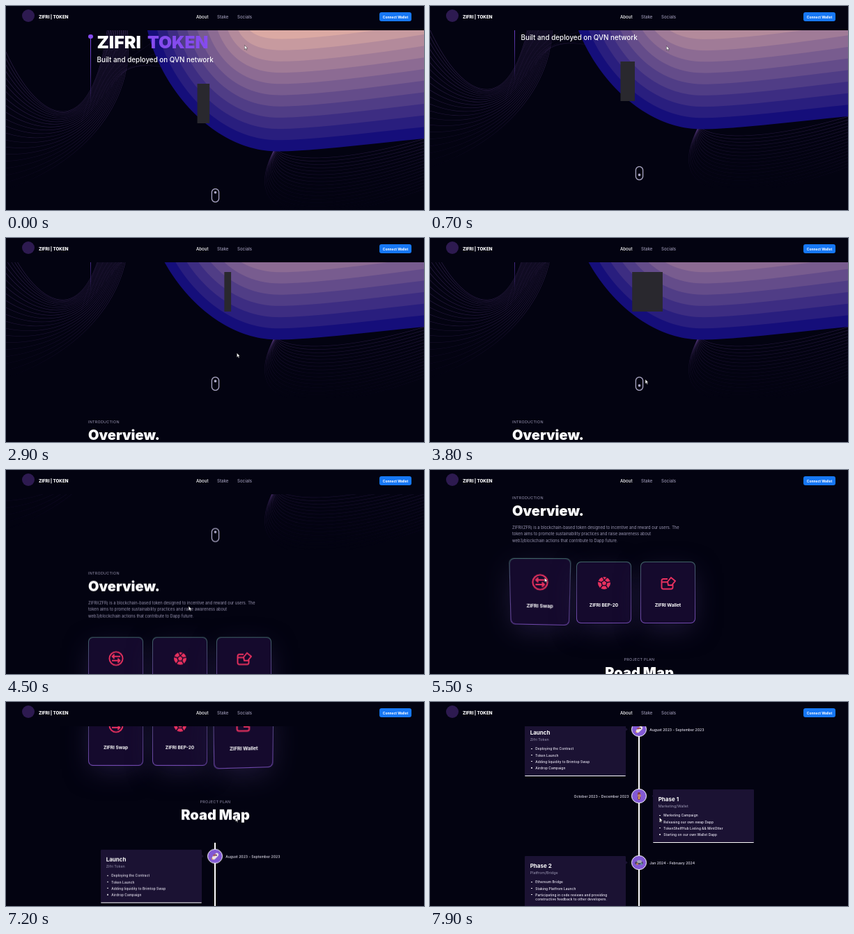
An HTML page with a canvas for the animation above (8000 ms loop, 600 by 294 pixels).

```html
<!DOCTYPE html>
<html lang="en">
<head>
<meta charset="utf-8">
<title>Token landing page</title>
<style>
  html, body { margin: 0; width: 100%; height: 100%; overflow: hidden; background: #030311; }
  #stage { position: relative; width: 600px; height: 294px; overflow: hidden; font-family: Inter, "Open Sans", sans-serif; }
  #page, #head, #stage canvas, .text, .box, .card { position: absolute; }
  #page { left: 0; top: 0; width: 600px; height: 920px; will-change: transform; }
  #page canvas { left: 0; top: 0; }
  #head { left: 0; top: 0; width: 600px; height: 34.5px; background: #030311; }
  .text { line-height: 0; white-space: pre; }
  .middle { transform: translateX(-50%); }
  .end { transform: translateX(-100%); }
  .card { top: 420px; width: 79px; height: 89px; border-radius: 6.5px;
    background: linear-gradient(#3f6466, #53427f 45%, #7048ad);
    box-shadow: 0 11px 38px -5px #211a3d; }
  .card::before { content: ""; position: absolute; inset: .6px; border-radius: 6px; background: #150a2d; }
  .card svg { position: absolute; left: 28.5px; top: 20px; width: 22px; height: 22px; }
  .panel { width: 145px; background: #1b1233; border-radius: 1.3px; border-bottom: 1.3px solid #fff; box-sizing: border-box; }
  #cursor { position: absolute; left: 0; top: 0; width: 6px; height: 9px; }
</style>
</head>
<body>
<div id="stage">
  <div id="page">
    <canvas id="backdrop"></canvas>
    <canvas id="model"></canvas>
  </div>
  <div id="head"></div>
  <svg id="cursor" viewBox="0 0 6 9"><path d="M.4.4V6.6L1.9 5.3 2.9 7.6 3.9 7.1 2.9 4.9H4.7Z" fill="#fff" stroke="#111" stroke-width=".4"/></svg>
</div>
<script>
const LOOP = 8000, SCALE = 2, GREY = '#9b97b3';
const $ = id => document.getElementById(id);
const page = $('page'), head = $('head');

const clamp = v => Math.min(1, Math.max(0, v));
const ease = v => { v = clamp(v); return v * v * (3 - 2 * v); };

// Linear interpolation through [seconds, value...] keys.
function track(keys, t) {
  const next = keys.findIndex(k => k[0] > t);
  if (next < 0) return keys[keys.length - 1].slice(1);
  if (next === 0) return keys[0].slice(1);
  const a = keys[next - 1], b = keys[next], u = (t - a[0]) / (b[0] - a[0]);
  return a.slice(1).map((v, i) => v + (b[i + 1] - v) * u);
}

const scrollKeys = [
  [0, 0], [.2, 0], [.42, 32], [1.82, 32], [2.08, 95], [2.35, 95], [2.6, 63], [3.85, 63],
  [4.1, 95], [4.35, 160], [4.6, 192], [4.85, 256], [5.05, 288], [6.92, 288], [7, 312],
  [7.1, 376], [7.2, 417], [7.3, 442], [7.4, 448], [7.6, 448], [7.7, 478], [7.8, 544], [7.9, 600]
];
const cursorKeys = [
  [0, 342, 56], [.7, 339, 57], [1.2, 339, 62], [1.8, 338, 115], [2.1, 338, 145], [2.8, 334, 160],
  [3.6, 310, 202], [3.9, 308, 204], [4.5, 262, 196], [5.1, 168, 158], [5.5, 164, 155],
  [5.85, 172, 158], [6.1, 245, 162], [6.3, 303, 165], [6.5, 329, 166]
];
const spinKeys = [[0, -108], [.7, -69], [2.1, 64], [3.8, 140], [8, 400]];

function add(parent, className, style) {
  const el = document.createElement('div');
  el.className = className;
  Object.assign(el.style, style);
  parent.append(el);
  return el;
}

// y is the middle of the capital letters.
function text(parent, x, y, str, size, weight = 400, color = '#fff', align = '', spacing = 0) {
  const el = add(parent, 'text ' + align, {
    left: x + 'px', top: y + 'px', fontSize: size + 'px',
    fontWeight: weight, color, letterSpacing: spacing + 'em'
  });
  el.textContent = str;
}

const box = (parent, x, y, w, h, background, radius = 0, extra = {}) => add(parent, 'box', {
  left: x + 'px', top: y + 'px', width: w + 'px', height: h + 'px',
  background, borderRadius: radius + 'px', boxSizing: 'border-box', ...extra
});

function sharp(canvas) {
  canvas.width = 600 * SCALE;
  canvas.height = 294 * SCALE;
  canvas.style.width = '600px';
  canvas.style.height = '294px';
  const ctx = canvas.getContext('2d');
  ctx.scale(SCALE, SCALE);
  return ctx;
}

function drawBackdrop(ctx) {
  const fade = (alpha, end) => {
    const g = ctx.createLinearGradient(0, 30, 0, end);
    g.addColorStop(0, `rgba(112,78,158,${alpha})`);
    g.addColorStop(.6, `rgba(98,64,142,${alpha * .75})`);
    g.addColorStop(1, 'rgba(80,50,120,0)');
    return g;
  };
  // Blends one bezier into another: [x, y, c1x, c1y, c2x, c2y, endX, endY].
  const ribbon = (first, last, count, stroke) => {
    ctx.strokeStyle = stroke;
    for (let i = 0; i < count; i++) {
      const [x, y, ...rest] = first.map((v, j) => v + (last[j] - v) * i / (count - 1));
      ctx.beginPath();
      ctx.moveTo(x, y);
      ctx.bezierCurveTo(...rest);
      ctx.stroke();
    }
  };
  ctx.lineWidth = .6;
  ribbon([-5, 55, 50, 185, 128, 195, 147, 20], [-5, 266, 110, 230, 195, 135, 172, 20], 21, fade(.5, 270));
  ribbon([108, 168, 130, 90, 150, 70, 152, 20], [165, 100, 180, 75, 230, 85, 300, 110], 9, fade(.16, 240));
  ribbon([386, 205, 400, 222, 470, 230, 605, 190], [386, 205, 335, 300, 420, 330, 605, 262], 17, fade(.6, 300));

  const from = [21, 14, 122], to = [219, 169, 163];
  for (let k = 0; k <= 10; k++) {
    const left = 198 + 14 * k, bx = 390 + .6 * k, by = 209.5 - 16.2 * k;
    ctx.fillStyle = `rgb(${from.map((c, i) => Math.round(c + (to[i] - c) * k / 10))})`;
    ctx.beginPath();
    ctx.moveTo(left, 0);
    ctx.bezierCurveTo(left + 4, by * .45, bx - 103 + 4.6 * k, by, bx, by);
    ctx.bezierCurveTo(bx + 50, by, 540, by - 13, 601, by - 18.5 - .5 * k);
    ctx.lineTo(601, 0);
    ctx.fill();
  }
}

function drawModel(ctx, t) {
  ctx.clearRect(0, 0, 600, 294);
  const angle = track(spinKeys, t)[0] * Math.PI / 180;
  const side = 57, width = Math.max(1, side * Math.abs(Math.cos(angle)));
  ctx.fillStyle = '#29282e';
  ctx.fillRect(300.5 + 18 * Math.sin(angle) - width / 2, 112, width, side);

  ctx.strokeStyle = '#aaa6c3';
  ctx.lineWidth = 1.3;
  ctx.beginPath();
  ctx.roundRect(295.4, 263.5, 10.2, 19, 5.1);
  ctx.stroke();
  const phase = ((t - .04 + 1.5) % 1.5) / 1.5;
  ctx.fillStyle = '#aaa6c3';
  ctx.beginPath();
  ctx.arc(300.5, 268.6 + 7 * ease(1 - Math.abs(1 - 2 * phase)), 1.8, 0, 7);
  ctx.fill();
}

function buildHeader() {
  box(head, 23, 5, 18, 18, '#2d1a50', 9);
  text(head, 47, 15.5, 'ZIFRI | TOKEN', 6.2, 800);
  text(head, 273, 15.5, 'About', 6.1, 500);
  text(head, 303, 15.5, 'Stake', 6.1, 500, GREY);
  text(head, 332, 15.5, 'Socials', 6.1, 500, GREY);
  box(head, 536, 9, 46, 13, '#1677f5', 3);
  text(head, 559, 15.7, 'Connect Wallet', 4.9, 700, '#fff', 'middle');
}

function buildIntro() {
  box(page, 120.5, 44, 1.5, 96, 'linear-gradient(#804dee, rgba(128,77,238,.55) 55%, rgba(128,77,238,0))');
  box(page, 118, 40.7, 6.6, 6.6, '#854bee', 4);
  text(page, 130.5, 52, 'ZIFRI', 25, 900);
  text(page, 203, 52, 'TOKEN', 24.5, 900, '#854bee');
  text(page, 130.5, 77, 'Built and deployed on QVN network', 9.85, 500);

  text(page, 118, 328, 'INTRODUCTION', 5.4, 400, GREY, '', .05);
  text(page, 118, 346.5, 'Overview.', 20, 900);
  [
    'ZIFRI(ZFR) is a blockchain-based token designed to incentive and reward our users. The',
    'token aims to promote sustainability practices and raise awareness about',
    'web3/blockchain actions that contribute to Dapp future.'
  ].forEach((line, i) => text(page, 118, 370.5 + i * 9.5, line, 5.75, 400, GREY));
}

const icons = {
  swap: '<circle cx="11" cy="11" r="9.6"/><path d="M17 8H6M8.6 5 5.6 8l3 3M5 14h11M13.4 11l3 3-3 3"/>',
  ball: '<circle cx="11" cy="11" r="9" fill="#e8315f" stroke="none"/><path stroke="#150a2d" stroke-width="1.4" d="M11 7l4 3-1.5 4.5h-5L7 10ZM11 7 8 1M11 7l5-5M15 10l6-1M13.5 14.5 17 20M8.5 14.5 5 19M7 10 1 8"/>',
  wallet: '<path d="M10 5H4Q1.5 5 1.5 7.5V17Q1.5 19.5 4 19.5H15Q17.5 19.5 17.5 17V13M2 9.5H11M10 9l5-6 6 5-5 6H11Z"/>'
};

function buildCard(x, label, icon, start, end) {
  const el = add(page, 'card', { left: x + 'px' });
  el.innerHTML = `<svg viewBox="0 0 22 22" fill="none" stroke="#e8315f" stroke-width="1.9">${icons[icon]}</svg>`;
  text(el, 39.5, 62.5, label, 6.5, 700, '#fff', 'middle');
  return { el, x, start, end };
}

function buildPhase(top, side, phase) {
  const x = side === 'left' ? 136 : 320, mid = top + 9.5;
  const panel = add(page, 'panel box', { left: x + 'px', top: top + 'px', height: phase.height + 'px' });
  box(page, side === 'left' ? 280 : 318.5, mid - 1.6, 3.2, 3.2, '#1b1233', 0, { transform: 'rotate(45deg)' });
  text(panel, 7.7, 13.5, phase.title, 8, 700);
  text(panel, 7.7, 23.5, phase.sub, 5.4, 400, GREY);
  let y = 37.3;
  phase.points.forEach(point => {
    box(panel, 9, y - .8, 1.6, 1.6, '#fff', 1);
    point.split('\n').forEach((line, i) => text(panel, 15.3, y + i * 6.3, line, 4.75, 500, '#f1eefa', '', .025));
    y += 9.2;
  });
  box(page, 289.3, mid - 10.8, 21.6, 21.6, '#8259d4', 11, { border: '1.3px solid #fff' });
  phase.art.forEach(([dx, dy, w, h, color, turn]) =>
    box(page, 300.1 + dx - w / 2, mid + dy - h / 2, w, h, color, Math.min(w, h) / 2, { transform: `rotate(${turn}deg)` }));
  const right = side === 'left';
  text(page, right ? 315.3 : 285.5, mid, phase.date, 5.15, 500, '#e2dfec', right ? '' : 'end');
}

function buildRoadMap() {
  text(page, 300.5, 561, 'PROJECT PLAN', 5.4, 400, GREY, 'middle', .05);
  text(page, 300.5, 580, 'Road Map', 20, 900, '#fff', 'middle');
  box(page, 299.4, 620, 1.5, 300, '#fff');
  buildPhase(630, 'left', {
    title: 'Launch', sub: 'Zifri Token', date: 'August 2023 - September 2023', height: 76.7,
    points: ['Deploying the Contract', 'Token Launch', 'Adding liquidity to Brimtop Swap', 'Airdrop Campaign'],
    art: [[-3, 3, 4, 3, '#eb9a3c', -45], [0, 0, 11, 5, '#eee5e4', -45], [-1, -2, 5, 2, '#a04652', -20], [2, -2, 2, 2, '#4b3a70', 0]]
  });
  buildPhase(726, 'right', {
    title: 'Phase 1', sub: 'Marketing/Wallet', date: 'October 2023 - December 2023', height: 76.7,
    points: ['Marketing Campaign', 'Releasing our own swap Dapp', 'TokenShelfHub Listing && MintOtter', 'Starting on our own Wallet Dapp'],
    art: [[0, 0, 3.4, 11, '#83404f', 0], [0, -1, 5, 4, '#c78268', 0], [0, 3, 2, 3, '#e3b466', 0]]
  });
  buildPhase(822, 'left', {
    title: 'Phase 2', sub: 'Platfrom/Bridge', date: 'Jan 2024 - February 2024', height: 84,
    points: ['Ethereum Bridge', 'Staking Platfrom Launch', 'Participating in code reviews and providing\nconstructive feedback to other developers.'],
    art: [[0, 0, 12, 4, '#4c4963', 0], [0, -2, 7, 4, '#a3a7b5', 0], [-3, 2, 3, 3, '#c27d58', 0], [3, 2, 3, 3, '#5e91a5', 0]]
  });
}

drawBackdrop(sharp($('backdrop')));
const model = sharp($('model'));
buildHeader();
buildIntro();
const cards = [
  buildCard(118, 'ZIFRI Swap', 'swap', 5, 5.95),
  buildCard(210, 'ZIFRI BEP-20', 'ball', 5.95, 6.3),
  buildCard(302, 'ZIFRI Wallet', 'wallet', 6.3, 99)
];
buildRoadMap();

// Cards lean toward the pointer while hovered.
function tilt({ el, x, start, end }, t, px, py) {
  const amount = ease((t - start) / .45) * (1 - ease((t - end) / .45));
  const turnX = (clamp((py - 132) / 89) * 45 - 22.5) * amount;
  const turnY = (22.5 - clamp((px - x) / 79) * 45) * amount;
  el.style.transform = amount
    ? `perspective(317px) rotateX(${turnX}deg) rotateY(${turnY}deg) scale(${1 + .1 * amount})` : 'none';
}

function frame(now) {
  const t = (now % LOOP) / 1000;
  const [px, py] = track(cursorKeys, t);
  page.style.transform = `translateY(${-track(scrollKeys, t)[0]}px)`;
  $('cursor').style.transform = `translate(${px}px, ${py}px)`;
  cards.forEach(card => tilt(card, t, px, py));
  drawModel(model, t);
}

const began = performance.now();
function tick() {
  frame(performance.now() - began);
  requestAnimationFrame(tick);
}
tick();
</script>
</body>
</html>
```
